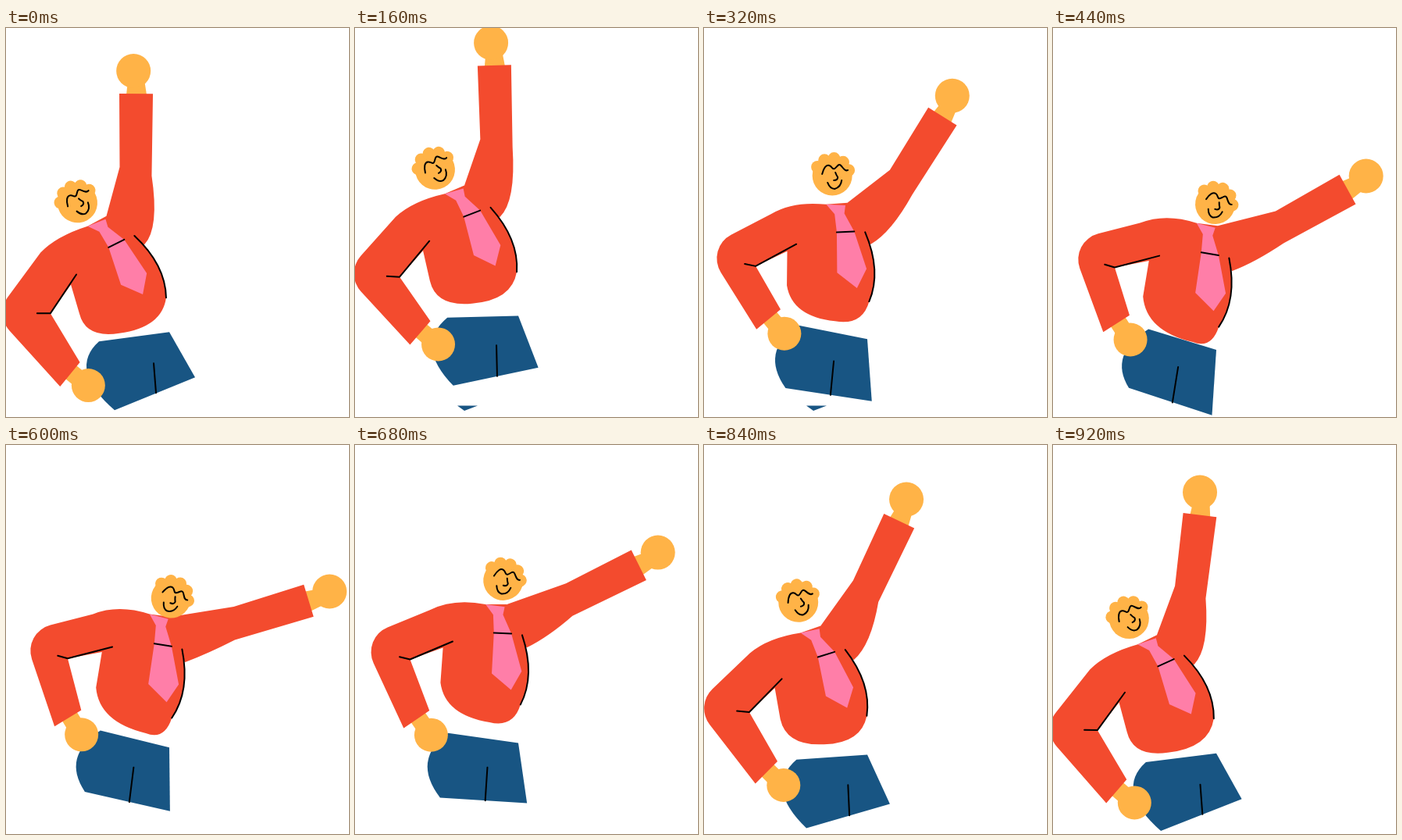
Write an HTML page with a canvas that moves like this. It is 439 px wide and 498 px high and loops after 0.96 s.

```html
<!DOCTYPE html>
<html lang="en">
<head>
<meta charset="utf-8">
<title>Dancing man</title>
<style>
  html, body { margin: 0; height: 100%; overflow: hidden; background: #fff; }
  canvas { display: block; }
</style>
</head>
<body>
<canvas width="439" height="498"></canvas>
<script>
const ctx = document.querySelector('canvas').getContext('2d');
const RED = '#f34b2e', SKIN = '#ffb347', PINK = '#ff7ea8', BLUE = '#185583';
const LOOP = 960, STEP = 40, RAD = Math.PI / 180;

// Upright pose around a joint: x, y, then how far the point turns
// (degrees) and stretches when the body is fully bent
const TURN = 36;
const back = [[-37, -22], [-77, -9], [-97, 12, 31], [-155, 92]];
const belly = [
  [-84, 90, 39], [-58, 53], [-47, 90, 30], [-39, 122, 22], [4, 115, 13],
  [59, 107, 28], [64, 69], [63, 27], [23, -10], [-13, -35]];
const armpit = [[55, -20, 31], [36, 1]];
const elbowLine = [[-101, 90], [-84, 90, 39], [-51, 40]];
const tie = [
  [-37, -22], [-14, -31], [-11, -21], [10, -5], [39, 38, 24],
  [34, 65, 24], [6, 53, 27], [-10, 5], [-22, -15]];
const trousers = [[0, 0], [33, 58, 34, 1.26], [-70, 100, 32], [-130, 48, 18], [-90, 12, 25]];
const crease = [[-20, 40, 40, 1.2], [-17, 78, 28, 1.1]];

// Rigid parts; the raised arm hangs on its elbow, the other on its hand
const sleeve = [[-20.5, -5], [-21.5, -99], [21.5, -99], [20.5, 6]];
const highWrist = [[-12.5, -98], [-10.5, -116], [10.5, -116], [13.5, -98]];
const cuff = [[-24, -27], [16, -27]];
const lowWrist = [[-12, -28], [10, -28], [10, -10], [-12, -10]];
const face = new Path2D('M-13-2C-11-10-8-14-4-13S0-7 3-9S8-16 11-13S16-5 20-7' +
  'M4-4Q5-1 7 2Q7 6 2 6M-6 9Q-3 17 3 17Q11 15 12 6');

function rotate([x, y], degrees) {
  const c = Math.cos(degrees * RAD), s = Math.sin(degrees * RAD);
  return [x * c - y * s, x * s + y * c];
}

function place(points, [x, y], degrees) {
  return points.map(p => {
    const [px, py] = rotate(p, degrees);
    return [x + px, y + py];
  });
}

function bend(shape, [x, y], amount) {
  return shape.map(([px, py, turn = TURN, stretch = 1]) => {
    const size = 1 + (stretch - 1) * amount;
    const [rx, ry] = rotate([px, py], turn * amount);
    return [x + rx * size, y + ry * size];
  });
}

// One letter per segment: L line, Q curve (two points), A rounded corner
function trace(points, commands = 'L'.repeat(points.length)) {
  let i = 0;
  ctx.beginPath();
  for (const c of commands) {
    if (c === 'Q') ctx.quadraticCurveTo(...points[i++], ...points[i++]);
    else if (c === 'A') ctx.arcTo(...points[i++], ...points[i], 34);
    else ctx.lineTo(...points[i++]);
  }
}

function fill(color, points, commands) {
  trace(points, commands);
  ctx.fillStyle = color;
  ctx.fill();
}

function line(points, commands) {
  trace(points, commands);
  ctx.stroke();
}

function disc([x, y], r) {
  ctx.beginPath();
  ctx.arc(x, y, r, 0, 2 * Math.PI);
  ctx.fillStyle = SKIN;
  ctx.fill();
}

function drawHead([x, y], degrees) {
  ctx.save();
  ctx.translate(x, y);
  ctx.rotate(degrees * RAD);
  disc([0, 0], 25.5);
  for (let a = -150; a < 0; a += 33) disc(rotate([22, 0], a), 8);
  ctx.stroke(face);
  ctx.restore();
}

function draw(t) {
  // Every joint swings as a cosine, with its own lag behind the body
  const wave = (lag, n = 1) => Math.cos(2 * Math.PI * n * (t - lag) / LOOP);
  const polar = ([x, y], degrees, r) => place([[0, -r]], [x, y], degrees)[0];

  const lean = .53 - .54 * wave(40);
  const knot = [172.7 - 32.5 * wave(40), 261 + 23 * wave(-35, 2) - 6 * wave(40)];
  const hip = [209, 390 + 14.5 * wave(-70, 2) - 10 * wave(40)];
  const legs = .5 - .5 * wave(0);
  const elbow = polar(knot, 44 - 31.5 * wave(60), 96);
  const armAngle = 34 - 40 * wave(87);
  const lowHand = [knot[0] - 71 + 37 * wave(50), knot[1] + 144.5 + 37.5 * wave(20)];
  const lowAngle = -41 - 10.5 * wave(60);
  const neck = 75 + 6 * wave(60) - 10 * wave(60) ** 2;
  const head = polar(knot, -17 - 29 * wave(60), neck);

  ctx.fillStyle = '#fff';
  ctx.fillRect(0, 0, 439, 498);
  ctx.strokeStyle = '#000';
  ctx.lineWidth = 2;
  ctx.lineCap = ctx.lineJoin = 'round';

  // Scrap of cloth that lingers below the trousers
  if (t >= 40 && t < 360) fill(BLUE, [[131, 483.5], [157, 483.5], [140, 490]]);

  fill(BLUE, bend(trousers, hip, legs), 'LLLQ');
  line(bend(crease, hip, legs));

  fill(SKIN, place(lowWrist, lowHand, lowAngle));
  disc(lowHand, 21.5);
  fill(SKIN, place(highWrist, elbow, armAngle));
  disc(place([[-3.5, -128]], elbow, armAngle)[0], 22);

  const front = bend(belly, knot, lean);
  fill(RED, [...bend(back, knot, lean), ...place(cuff, lowHand, lowAngle), ...front],
    'LQALLLLLQQQL');
  fill(RED, [front[9], ...place(sleeve, elbow, armAngle), ...bend(armpit, knot, lean), knot],
    'LLLLLQL');

  const cloth = bend(tie, knot, lean);
  fill(PINK, cloth);
  line([cloth[3], cloth[7]]);
  line(front.slice(6, 9), 'LQ');
  line(bend(elbowLine, knot, lean));
  drawHead(head, -2 - 30 * wave(70));
}

function tick(now) {
  draw(Math.floor(now % LOOP / STEP) * STEP);
  requestAnimationFrame(tick);
}
tick(performance.now());
</script>
</body>
</html>
```
